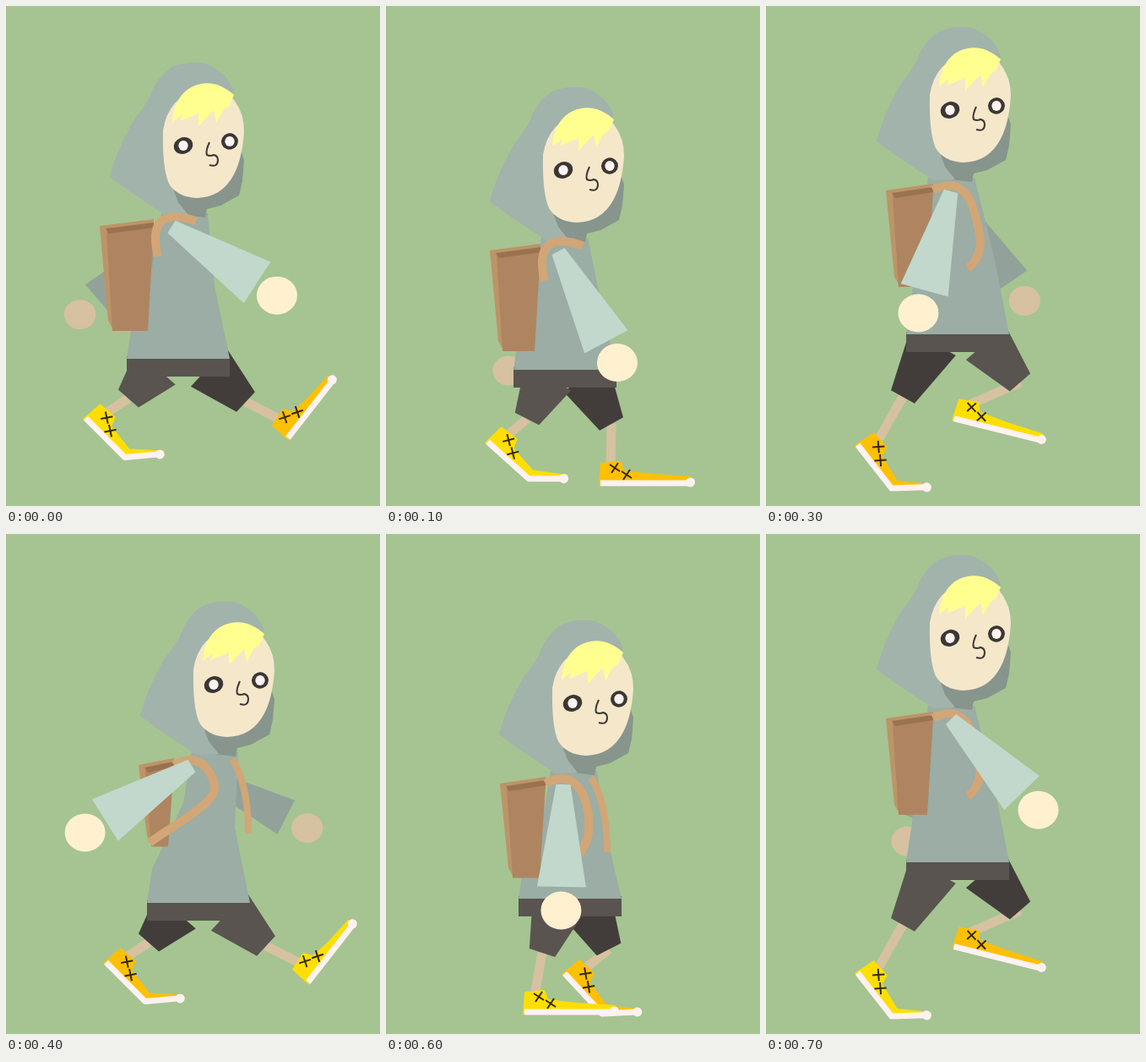
An HTML page with a canvas for the animation above (800 ms loop, 443 by 591 pixels).

```html
<!DOCTYPE html>
<html lang="en">
<head>
<meta charset="utf-8">
<title>Walk cycle</title>
<style>
html, body { margin: 0; width: 100%; height: 100%; overflow: hidden; background: #a5c492; }
canvas { display: block; width: 100%; height: 100%; }
</style>
</head>
<body>
<canvas id="stage" width="443" height="591"></canvas>
<script>
const ctx = document.getElementById('stage').getContext('2d');
const STEP = 100;
const C = {
  bg: '#a5c492', hood: '#a2b3ab', lining: '#87958d', body: '#9bada4', farSleeve: '#92a29b',
  sleeve: '#c2d8cd', hand: '#fff0cf', skin: '#d6c1a1', face: '#f5e7ca', hair: '#ffff90',
  ink: '#3a3734', flap: '#bd9467', bag: '#ae8560', inside: '#997250', strap: '#d2a676',
  shorts: '#595450', farShorts: '#423d3b', near: '#ffdf00', far: '#ffc003', sole: '#fff2f1', lace: '#33290c'
};

// Body key poses; arms are angles in degrees, turn swings the torso to the viewer
const poses = [
  { hip: [204, 417], head: [-8, 42], arm: 33, farArm: 139, turn: -0.4 },
  { hip: [212, 430], head: [-8, 71], arm: 62, farArm: 115, turn: -0.2 },
  { hip: [217, 430], head: [-6, 70], arm: 91, farArm: 91, turn: 0 },
  { hip: [227, 388], head: [0, 0], arm: 105, farArm: 56, turn: 0 },
  { hip: [228, 436], head: [28, 55], arm: 148, farArm: 27, turn: 0.7 },
  { hip: [222, 433], head: [14, 80], arm: 120, farArm: 60, turn: 0.4 },
  { hip: [218, 431], head: [3, 77], arm: 91, farArm: 91, turn: 0.1 },
  { hip: [227, 388], head: [0, 0], arm: 46, farArm: 112, turn: 0 }
];
// One leg's cycle, measured from the hip; the far leg runs half a cycle behind
const steps = [
  { knee: [-59, 47], heel: [-113, 71], pitch: 45, toe: -5 },
  { knee: [-45, 58], heel: [-95, 86], pitch: 42, toe: 0 },
  { knee: [46, 60], heel: [-10, 89], pitch: 47, toe: -3 },
  { knee: [74, 57], heel: [-7, 102], pitch: 14, toe: 14 },
  { knee: [80, 51], heel: [131, 97], pitch: -52, toe: -52 },
  { knee: [55, 64], heel: [40, 137], pitch: 0, toe: 0 },
  { knee: [-33, 64], heel: [-56, 137], pitch: 0, toe: 0 },
  { knee: [-65, 74], heel: [-122, 131], pitch: 52, toe: -2 }
];

const rad = deg => deg * Math.PI / 180;
const add = (p, x, y) => [p[0] + x, p[1] + y];
const polar = (p, r, deg) => add(p, r * Math.cos(rad(deg)), r * Math.sin(rad(deg)));

function trace(pts) {
  ctx.beginPath();
  pts.forEach(p => ctx.lineTo(...p));
}
function poly(color, ...pts) {
  trace(pts);
  ctx.fillStyle = C[color];
  ctx.fill();
}
function line(color, width, ...pts) {
  trace(pts);
  ctx.strokeStyle = C[color];
  ctx.lineWidth = width;
  ctx.stroke();
}
function shape(color, d) {
  ctx.fillStyle = C[color];
  ctx.fill(new Path2D(d));
}
function curve(color, width, d) {
  ctx.strokeStyle = C[color];
  ctx.lineWidth = width;
  ctx.stroke(new Path2D(d));
}
function oval(color, [x, y], rx, ry, deg = 0) {
  ctx.fillStyle = C[color];
  ctx.beginPath();
  ctx.ellipse(x, y, rx, ry, rad(deg), 0, 7);
  ctx.fill();
}
function limb(color, a, b, wa, wb) {
  const deg = Math.atan2(b[1] - a[1], b[0] - a[0]) * 180 / Math.PI + 90;
  poly(color, polar(a, wa / 2, deg), polar(b, wb / 2, deg), polar(b, -wb / 2, deg), polar(a, -wa / 2, deg));
}
function at([x, y], deg, paint) {
  ctx.save();
  ctx.translate(x, y);
  ctx.rotate(rad(deg));
  paint();
  ctx.restore();
}

function shoe(color, heel, { pitch, toe }) {
  const len = 112 * (1 + Math.min(0, pitch) / 280);
  const ball = [len * 0.6, -3];
  const tip = polar(ball, len * 0.36, toe - pitch);
  at(heel, pitch, () => {
    poly(color, [0, 0], [2, -27], [26, -29], [30, -18], add(ball, -3, -11), add(tip, 2, -8), tip, ball);
    line('sole', 7, [2, -3], ball, tip);
    oval('sole', add(tip, 1, -1), 5.5, 5.5);
    for (const [x, y] of [[19, -21], [33, -13]]) {
      line('lace', 2, [x - 6, y - 4], [x + 6, y + 4]);
      line('lace', 2, [x + 4, y - 6], [x - 4, y + 6]);
    }
  });
}

function leg(hip, step, cloth, color) {
  const knee = add(hip, ...step.knee);
  const heel = add(hip, ...step.heel);
  const ankle = polar(polar(heel, 14, step.pitch), 22, step.pitch - 90);
  line('skin', 11, knee, ankle);
  shoe(color, heel, step);
  limb(cloth, add(hip, step.knee[0] * 0.45, 10), knee, 62, 32);
}

function arm(shoulder, deg, sleeve, skin, size) {
  const cuff = polar(shoulder, 121, deg);
  limb(sleeve, shoulder, cuff, 17, 58 * size);
  oval(skin, polar(cuff, 28, deg), 24 * size, 22.5 * size);
}

function torso([hx, hy], [nx, ny]) {
  poly('body', [nx - 28, ny], [nx + 27, ny], [hx + 43, (hy + ny) / 2], [hx + 61, hy],
    [hx - 61, hy], [hx - 55, hy - 40], [nx - 38, ny + 60]);
}

function pack(shoulder, turn) {
  const w = 56 - 20 * turn, h = 122 - 25 * turn;
  at(add(shoulder, -21, -9), 0, () => {
    poly('flap', [-w, 8], [0, 0], [0, 14], [-w + 10, 18], [-w + 17, h], [-w + 10, h - 12]);
    poly('bag', [-w + 8, 14], [0, 9], [-7, h], [-w + 15, h]);
    poly('inside', [-w + 7, 11], [0, 4], [0, 10], [-w + 11, 17]);
  });
}

function straps(shoulder, neck, turn) {
  at(shoulder, 0, () => {
    const end = 20 - 100 * turn;
    curve('strap', 10, turn < 0
      ? 'M-16 35Q-26 -4 -4 -11Q14 -14 29 -6'
      : `M-21 -1C4 -16 21 0 27 22S${end + 24} 72 ${end} 91`);
  });
  if (turn > 0) at(neck, 0, () => curve('strap', 8, 'M20 8Q39 38 39 96'));
}

function head([dx, dy]) {
  at([dx, dy], 0, () => {
    shape('lining', 'M286 128L290 140 288 165 284 182 262 194 246 198 244 208 218 205 206 176Z');
    shape('hood', 'M131 160Q138 130 160 92Q170 80 178 66Q186 42 205 30Q224 22 245 26Q270 36 278 59L262 90 220 110 206 174 212 190 224 205 198 206 184 197 150 174Z');
    shape('face', 'M194 105Q200 65 240 55Q270 55 280 72Q290 86 290 106Q288 138 278 157Q264 184 234 185Q211 184 201 168Q193 150 194 105Z');
    shape('hair', 'M205 95Q207 68 224 56Q240 46 258 51Q269 55 278 63L272 77 266 80 257 96 254 81 236 100 236 85 214 94 217 86Z');
    for (const [x, y, rx] of [[218, 123, 11.5], [273, 118, 10]]) {
      oval('ink', [x, y], rx, 9.7, -20);
      oval('sole', [x, y], 5.7, 6);
    }
    curve('ink', 2, 'M249 119Q244 130 246 134Q250 136 254 134Q259 135 259 140Q259 149 249 146');
  });
}

function figure(i) {
  const { hip, head: face, arm: near, farArm, turn } = poses[i];
  const neck = add(face, 220, 203);
  const shoulder = [hip[0] - 8, face[1] + 219];
  arm(add(shoulder, 4, 6), farArm, 'farSleeve', 'skin', 0.78);
  leg(hip, steps[(i + 4) % 8], 'farShorts', 'far');
  leg(hip, steps[i], 'shorts', 'near');
  limb('shorts', add(hip, -61, 9), add(hip, 61, 9), 24, 24);
  torso(hip, neck);
  head(face);
  pack(shoulder, turn);
  straps(shoulder, neck, turn);
  arm(shoulder, near, 'sleeve', 'hand', 1);
}

ctx.lineJoin = 'round';
const start = performance.now();
function tick() {
  const t = performance.now() - start;
  ctx.fillStyle = C.bg;
  ctx.fillRect(0, 0, 443, 591);
  figure(Math.floor(t / STEP) % poses.length);
  requestAnimationFrame(tick);
}
tick();
</script>
</body>
</html>
```
